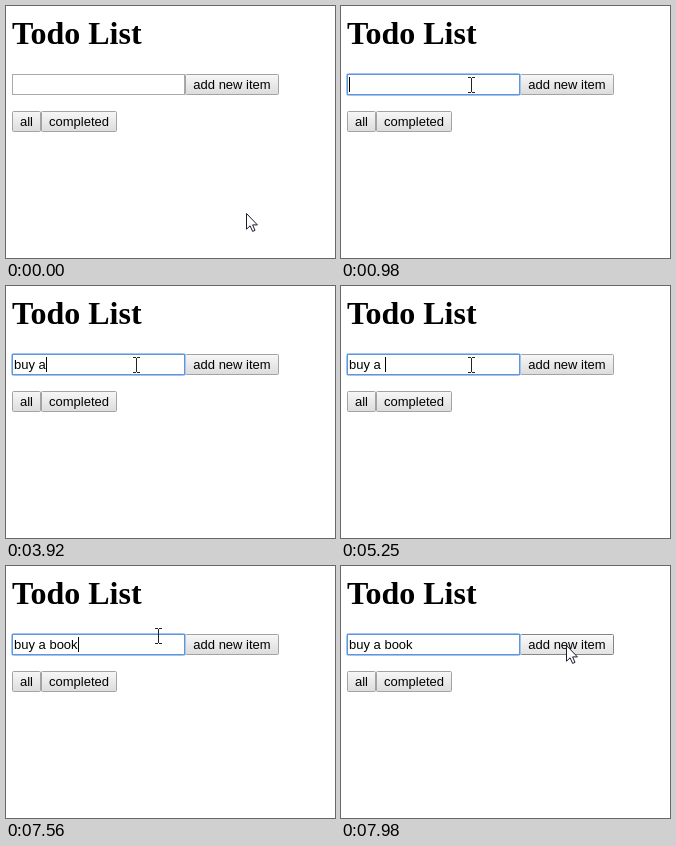
Recreate the animation shown at these times as an HTML page. Size 329 px wide and 252 px high, loop 8000 ms.

```html
<!DOCTYPE html>
<html lang="en">
<head>
<meta charset="utf-8">
<title>Todo List</title>
<style>
  html, body { margin: 0; width: 100%; height: 100%; overflow: hidden; background: #fff; }
  svg { display: block; width: 100%; height: 100%; }
  text { font: 13px "Liberation Sans", Arial, sans-serif; fill: #000; white-space: pre; }
  .title { font: bold 32px "Liberation Serif", "Times New Roman", serif; }
  .button rect { fill: url(#face); stroke: #a3a3a3; }
  .button.hover rect { fill: url(#faceHover); stroke: #858585; }
  .button text { text-anchor: middle; }
</style>
</head>
<body>
<svg viewBox="0 0 329 252">
  <defs>
    <linearGradient id="face" x2="0" y2="1">
      <stop stop-color="#f7f7f7"/><stop offset="1" stop-color="#dcdcdc"/>
    </linearGradient>
    <linearGradient id="faceHover" x2="0" y2="1">
      <stop stop-color="#fafafa"/><stop offset="1" stop-color="#e2e2e2"/>
    </linearGradient>
  </defs>
  <rect width="329" height="252" fill="#fff"/>
  <text class="title" x="6" y="38">Todo List</text>
  <rect x="6.5" y="68.5" width="172" height="20" fill="#fff" stroke="#a9a9a9"/>
  <g id="buttons"></g>
  <g id="ring" fill="none">
    <rect x="5.5" y="67.5" width="174" height="22" rx="2" stroke="#a4c4ef"/>
    <rect x="6.5" y="68.5" width="172" height="20" stroke="#5f95dc"/>
  </g>
  <text id="entry" x="8" y="83"></text>
  <rect id="caret" y="71" width="1" height="15"/>
  <path id="arrow" d="M.5 .5V16.2L4.1 12.8 6.6 18.4 9 17.4 6.6 11.9H11.4Z"
        fill="#fff" stroke="#1c1c2c" stroke-linejoin="round"/>
  <path id="beam" d="M-3 -7.5H0M1 -7.5H4M.5 -7V7M-3 7.5H0M1 7.5H4" fill="none" stroke="#222"/>
</svg>
<script>
const LOOP = 8000, STEP = 70, FOCUS = 980;
const PHRASE = 'buy a book';
const keyTimes = [2310, 2660, 3010, 3430, 3920, 4270, 5670, 6020, 6230, 6510];
const caretX = [8, 15, 22, 29, 33, 40, 44, 51, 58, 65, 72];
const caretOff = [[1400, 1890], [4760, 5250], [7000, 7490], [7980, LOOP]];

// Pointer positions on the way to the button, one per step
const toButton = [[130, 79], [137, 77], [152, 70], [176, 59], [198, 53],
                  [212, 61], [219, 69], [223, 75], [225, 79]];

const $ = id => document.getElementById(id);
const show = (el, on) => el.setAttribute('visibility', on ? 'visible' : 'hidden');
const place = (el, x, y) => el.setAttribute('transform', `translate(${x} ${y})`);
const clamp = (v, lo, hi) => Math.min(hi, Math.max(lo, v));

function addButton(label, x, y, w) {
  $('buttons').insertAdjacentHTML('beforeend',
    `<g class="button"><rect x="${x + .5}" y="${y + .5}" width="${w - 1}" height="20" rx="1"/>
     <text x="${x + w / 2}" y="${y + 15}">${label}</text></g>`);
  return $('buttons').lastElementChild;
}

const addItem = addButton('add new item', 179, 68, 94);
addButton('all', 6, 105, 29);
addButton('completed', 35, 105, 76);

// The pointer moves in discrete steps
function pointerAt(t) {
  if (t < 7490) {
    const k = clamp(Math.floor((t - 420) / STEP) + 1, 0, 7) / 7;
    const e = k * k * (3 - 2 * k);
    return [Math.round(240 - 110 * e), Math.round(207 - 128 * e)];
  }
  return toButton[clamp(Math.floor((t - 7490) / STEP) + 1, 0, 8)];
}

function draw(t) {
  const typed = keyTimes.filter(k => k <= t).length;
  $('entry').textContent = PHRASE.slice(0, typed);
  $('caret').setAttribute('x', caretX[typed]);
  show($('caret'), t >= FOCUS && !caretOff.some(([a, b]) => t >= a && t < b));
  show($('ring'), t >= FOCUS);

  const [x, y] = pointerAt(t);
  const inRow = y >= 68 && y < 89;
  const overInput = inRow && x >= 6 && x < 179;
  show($('arrow'), !overInput);
  show($('beam'), overInput);
  place($('arrow'), x, y);
  place($('beam'), x, y);
  addItem.classList.toggle('hover', inRow && x >= 179 && x < 273);
}

function tick() {
  draw(performance.now() % LOOP);
  requestAnimationFrame(tick);
}
tick();
</script>
</body>
</html>
```
